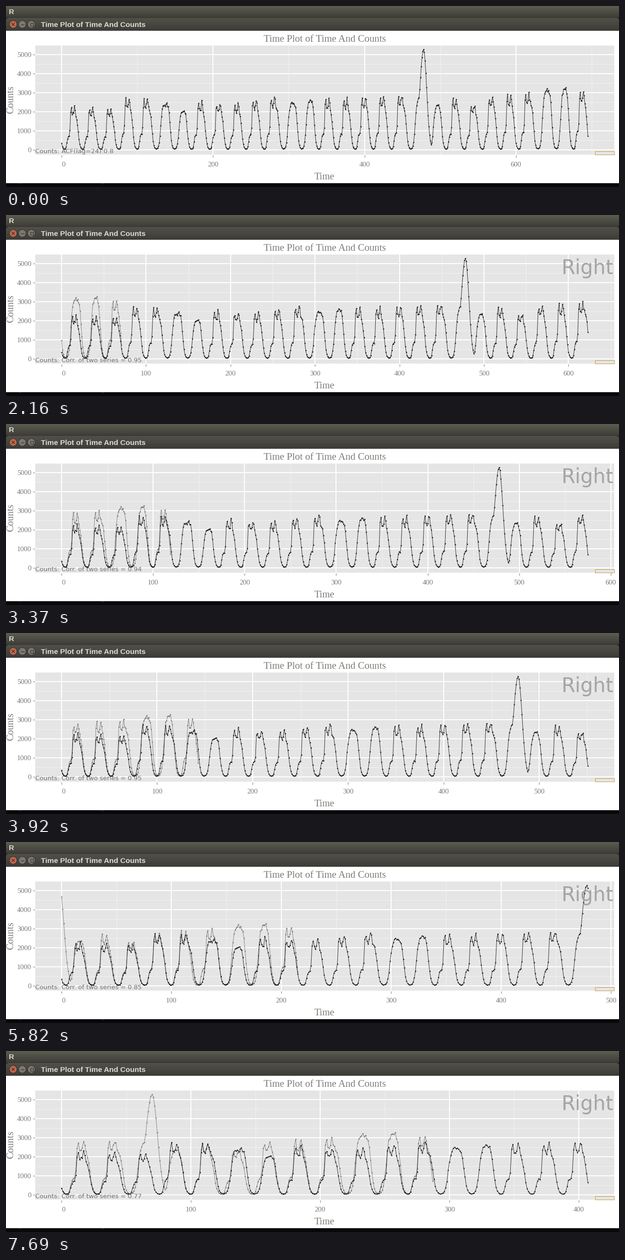
These frames come from a looping animation (1280 px wide and 380 px high, 8 s). A matplotlib script:

```python
import numpy as np
import matplotlib.pyplot as plt
from matplotlib.animation import FuncAnimation
from matplotlib.patches import Circle, Polygon, Rectangle

W, H, DPI = 1280, 380, 80
PX = 72 / DPI                       # points per pixel
LOOP, STEP = 8000, 20               # ms
LEFT, RIGHT, TOP, BOTTOM = 61, 1270, 83, 312
X0, SPAN, Y0, Y_SCALE = 116, 1099, 302, 0.04
GREY = "#7c7a77"
SERIF, SANS, BOLD = "Liberation Serif", "DejaVu Sans", "Liberation Sans"

N_DAYS, PERIOD = 29, 24
# Daily level of the counts, between key days
KEY_DAYS = [0, 2, 3, 4, 6, 7, 9, 11, 12, 14, 18, 20, 21, 22, 23, 25, 28]
KEY_LEVELS = [2350, 2230, 2880, 2780, 2030, 2620, 2520, 2840, 2420, 2760, 3030,
              2340, 2750, 2500, 2920, 3120, 3220]
SURGE_HOUR, SURGE_PEAK = 478, 5270

# Each wrap shifts the series by one more day; the key is let go now and then
WRAP_TIMES = [900, 1540, 2160, 2670, 3370, 3920, 4540, 5150, 5820, 6530, 7100, 7690]
KEY_UP = [(0, 900), (2430, 2670), (4440, 4540), (6410, 6530)]


def logistic(x):
    return 0.5 * (1 + np.tanh(x / 2))


def bump(x, width):
    return np.exp(-(x / width) ** 2)


def day_shape(hour, weekday):
    """Share of the daily level; weekday 0 is a Monday."""
    bedtime = 23.4 if weekday in (4, 5) else 22
    fall = logistic((bedtime - hour) / 1.1)
    if weekday >= 5:
        return logistic((hour - 11) / 1.1) * fall
    commute = 0.36 * logistic((hour - 7) / 0.6)
    noon = 0.6 * logistic((hour - 11.35) / 0.3)
    crowd = 0.8 + 0.18 * bump(hour - 12.7, 1) + 0.2 * bump(hour - 17.2, 1.25)
    return (commute + noon) * crowd * fall


def build_series():
    hours = np.arange(N_DAYS * PERIOD)
    series = np.full(len(hours), 35.0)
    for day in range(-1, N_DAYS):
        level = np.interp(day, KEY_DAYS, KEY_LEVELS)
        series += level * day_shape(hours - PERIOD * day, day % 7)
    series *= 1 + np.random.default_rng(4).normal(0, 0.025, len(hours))
    width = np.where(hours < SURGE_HOUR, 7, 5.8)
    return np.maximum(series, SURGE_PEAK * bump(hours - SURGE_HOUR, width))


def to_y(value):
    return Y0 - Y_SCALE * value


def segments(positions, low, high):
    """Parallel strokes as one broken line: (positions, extents)."""
    along = np.repeat(np.asarray(positions, float), 3)
    across = np.tile([low, high, np.nan], len(positions))
    return along, across


def label(x, y, text, size, color=GREY, family=SERIF, **kw):
    return ax.text(x, y, text, fontsize=size * PX, color=color, family=family,
                   va="baseline", **kw)


def stroke(x, y, color, width, **kw):
    return ax.plot(x, y, color=color, lw=width * PX, solid_capstyle="butt", **kw)[0]


def gradient(top, bottom, first, last):
    rows = np.linspace(first, last, bottom - top)[:, None, :] / 255
    ax.imshow(rows, extent=(0, W, bottom, top), aspect="auto", interpolation="nearest")


def draw_window():
    gradient(0, 24, (93, 92, 80), (62, 61, 56))
    gradient(24, 52, (82, 81, 73), (61, 60, 55))
    stroke([0, W], [23.5, 23.5], "#34332f", 1)
    for corner, inner in ((0, 4), (W, W - 4)):
        ax.add_patch(Polygon([(corner, 24), (inner, 24), (corner, 28)], color="#2b2a27"))
    label(6, 17, "R", 15, "#dfdbd2", BOLD, weight="bold")
    label(73, 44, "Time Plot of Time And Counts", 15.35, "#dfdbd2", BOLD, weight="bold")
    for x, fill in ((15, "#c4664c"), (34, "#7b7970"), (53, "#7b7970")):
        ax.add_patch(Circle((x, 38.5), 7.8, fc=fill, ec="#32312d", lw=PX))
    ink = "#35342f"
    stroke([12, 18, np.nan, 12, 18], [35.5, 41.5, np.nan, 41.5, 35.5], ink, 1.3)
    stroke([30.5, 37.5], [38.5, 38.5], ink, 1.3)
    ax.add_patch(Rectangle((50.5, 35.5), 6, 6, fill=False, ec=ink, lw=1.2 * PX))
    ax.add_patch(Rectangle((0, 372), W, 8, color="#07080b", lw=0))
    stroke([28, 31, np.nan, 199, 203], [373, 373, np.nan, 373, 373], "#3d4347", 1)


def draw_panel():
    ax.add_patch(Rectangle((LEFT, TOP), RIGHT - LEFT, BOTTOM - TOP, color="#e5e5e5", lw=0))
    rows = np.arange(0, 5001, 1000)
    for values, color, width in ((rows[:-1] + 500, "#f2f2f2", 1), (rows, "white", 2)):
        y, x = segments(to_y(values), LEFT, RIGHT)
        stroke(x, y, color, width)
    y, x = segments(to_y(rows), 55.5, 60)
    stroke(x, y, GREY, 1)
    for value in rows:
        label(53, to_y(value) + 5, str(value), 15, ha="right")
    label(665.5, 75, "Time Plot of Time And Counts", 20.7, ha="center")
    label(665, 364, "Time", 20.5, ha="center")
    label(15, 197, "Counts", 20.8, ha="center", rotation=90, rotation_mode="anchor")
    ax.add_patch(Rectangle((1229.5, 304.5), 40.5, 7, fc="#e5e5e5", ec="#c3a04a", lw=PX,
                           zorder=5))


series = build_series()
fig = plt.figure(figsize=(W / DPI, H / DPI), dpi=DPI, facecolor="white")
ax = fig.add_axes([0, 0, 1, 1])
draw_window()
draw_panel()
ax.set(xlim=(0, W), ylim=(H, 0))
ax.axis("off")

minor_grid = stroke([], [], "#f2f2f2", 1)
major_grid = stroke([], [], "white", 2)
x_ticks = stroke([], [], GREY, 1)
x_labels = [label(0, 337, "", 15, ha="center") for _ in range(8)]
wrapped = stroke([], [], "#7d7d7d", 0.9, marker="o", ms=2.3 * PX, mec="none",
                 mfc="#666666", zorder=3)
main = stroke([], [], "#1c1c1c", 0.9, marker="o", ms=2.5 * PX, mec="none",
              mfc="#101010", zorder=4)
note = label(61, 309, "", 13.1, "#737373", SANS, zorder=5)
key_name = label(1269.5, 124, "Right", 41.5, "#a5a5a5", SANS, ha="right", zorder=5)


def tick_step(last):
    cell = last * (RIGHT - LEFT) / SPAN / 5
    return 200 if 200 - cell < 1.5 * (cell - 100) else 100


def note_text(lag):
    if lag == 0:
        return "Counts: ACF(lag=24):0.8"
    r = np.corrcoef(series[:lag], series[-lag:])[0, 1]
    return f"Counts: Corr. of two series = {r:.2f}"


def update(frame):
    now = frame * STEP + STEP / 2
    lag = PERIOD * sum(start <= now for start in WRAP_TIMES)
    keep = len(series) - lag
    scale = SPAN / (keep - 1)
    step = tick_step(keep - 1)

    main.set_data(X0 + scale * np.arange(keep), to_y(series[:keep]))
    wrapped.set_data(X0 + scale * np.arange(lag), to_y(series[keep:]))

    values = np.arange(0, (RIGHT - X0) / scale, step)
    halves = np.arange(step / 2, (RIGHT - X0) / scale, step)
    major_grid.set_data(*segments(X0 + scale * values, TOP, BOTTOM))
    minor_grid.set_data(*segments(X0 + scale * halves, TOP, BOTTOM))
    x_ticks.set_data(*segments(X0 + scale * values, 313, 317.5))
    for i, text in enumerate(x_labels):
        text.set_visible(i < len(values))
        text.set_text(str(i * step))
        text.set_x(X0 + scale * i * step if i else X0 + 3.7)

    note.set_text(note_text(lag))
    key_name.set_visible(not any(a <= now < b for a, b in KEY_UP))
    return main, wrapped, major_grid, minor_grid, x_ticks, *x_labels, note, key_name


animation = FuncAnimation(fig, update, frames=LOOP // STEP, interval=STEP, repeat=True,
                          repeat_delay=0, blit=False)
plt.show()
```
